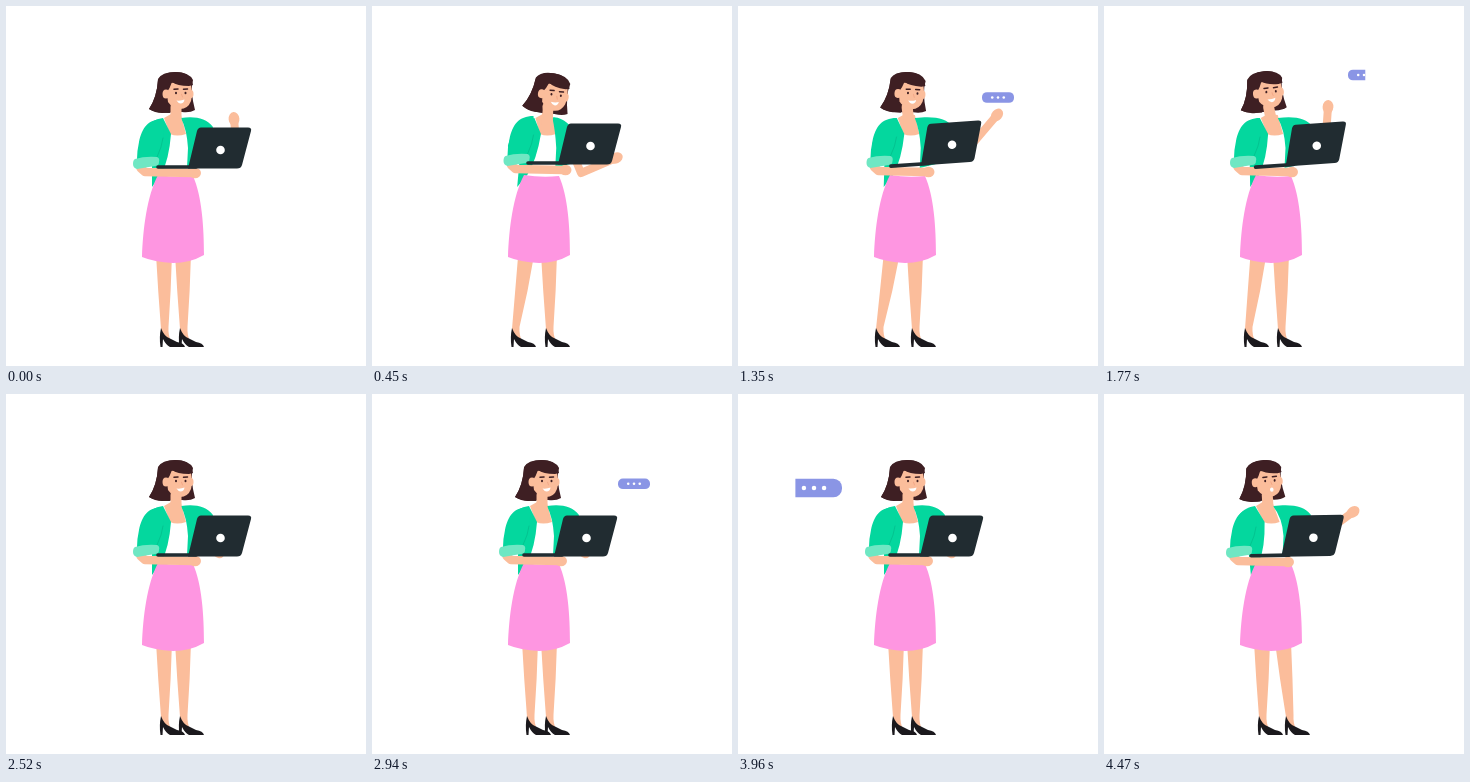
An HTML page with a canvas that plays this animation: 360 by 360 pixels, repeating every 4.5 s.

```html
<!DOCTYPE html>
<html lang="en">
<head>
<meta charset="utf-8">
<title>Woman with laptop</title>
<style>
html, body { margin: 0; width: 100%; height: 100%; overflow: hidden; background: #fff; }
canvas { display: block; width: 100vw; height: 100vh; }
</style>
</head>
<body>
<canvas id="stage"></canvas>
<script>
const LOOP = 4500, SIZE = 360;
const canvas = document.getElementById('stage');
const ctx = canvas.getContext('2d');
const C = {
  skin: '#fbbd9b', hair: '#3e1f23', green: '#04d79e', seam: '#04b587', cuff: '#6fe7c3',
  pink: '#fe96e1', dark: '#212c31', shoe: '#1b191d', bubble: '#8a95e5', white: '#fff'
};

const shapes = {
  skirt: 'M152 169 Q170 172 187 170 C196 190 198 222 198 249 Q184 257 167 257 Q148 256 136 251 C137 222 141 190 152 169Z',
  jacket: 'M157 112 C144 114 136 122 133 140 L139 158 L146 157 L146 181 L155 169 Q163 154 165 128 Z',
  shirt: 'M160 122 L181 122 Q185 143 183 168 L184 170 Q168 171 154 169 Z',
  neckline: 'M158 112 L165 108 L175 109 L180 128 Q171 131 164 128Z',
  sleeve: 'M157 113 C142 113 136 122 133 136 Q131 145 131 153 L151 153 Q156 143 158 130Z',
  cuff: 'M129 153 Q139 150 151 151 Q154 152 153 156 Q153 160 149 160 L131 163 Q127 162 127 158 Q127 154 129 153Z',
  hairBack: 'M152 73 Q156 66 169 66 Q183 66 187 74 Q184 85 189 104 Q184 107 176 106 L156 107 Q149 107 143 103 Q151 91 152 73Z',
  face: 'M160 80 Q160 76 171 77 L185 79 Q187 88 185 95 Q182 103 174 103 Q166 102 162 96Z',
  bangs: 'M152 74 Q157 66 170 66 Q184 66 187 79 L183 80 Q171 80 166 76 Q164 82 161 86 L160 95 Q164 102 164 107 Q149 107 143 103 Q151 91 152 74Z',
  smile: 'M170.5 94.5 Q175 95 178.5 93.5 Q178 97.5 174.5 97.5 Q172 97 170.5 94.5Z',
  shoe: 'M155 322 Q158 330 163 332 L171 336 Q178 337 179 341 L164 341 Q160 339 157 333 L156.5 341 L154.5 341 Q153 331 155 322Z',
  screen: 'M195 121.5 L242 121.5 Q246 121.5 245 125 L236 159 Q235 162.5 231 162.5 L182 162.5 L191 125 Q192 121.5 195 121.5Z'
};
for (const name in shapes) shapes[name] = new Path2D(shapes[name]);

const mix = (a, b, u) => a + (b - a) * u;

function ease(t, from, to) {
  const u = Math.min(1, Math.max(0, (t - from) / (to - from)));
  return u * u * (3 - 2 * u);
}

// Rises over a..b and falls over c..d.
const swell = (t, a, b, c, d) => ease(t, a, b) - ease(t, c, d);

// Elbow and hand of the free arm, blended from gesture to gesture.
function armPose(t) {
  const raised = [230, 135, 228, 113], low = [209, 167, 244, 152];
  const pointing = [236, 136, 259, 109], waving = [222, 130, 224, 101];
  const hidden = [204, 150, 212, 158], reaching = [230, 132, 249, 118];
  let pose = raised;
  const move = (next, from, to) => {
    pose = pose.map((v, i) => mix(v, next[i], ease(t, from, to)));
  };
  move(low, 0, 450);
  move(pointing, 500, 1150);
  move(waving, 1350, 1770);
  move(hidden, 1770, 2200);
  move(reaching, 3950, 4470);
  return pose;
}

function poseAt(t) {
  const lean = swell(t, 0, 450, 700, 1350);
  const tilt = swell(t, 900, 1350, 1800, 2250);
  const back = swell(t, 1350, 1770, 1770, 2200);
  const turned = ease(t, 3950, 4470);
  const nod = swell(t, 2900, 3390, 3390, 3900);
  return {
    head: [6.5 * lean - tilt - 5 * back - 7.5 * turned + 1.5 * nod, lean - back,
      9 * lean + 3 * tilt - 8 * back - 4 * turned],
    body: 4.5 * lean + 1.5 * tilt - 2.5 * back - 5 * turned,
    shoulder: 206 - 8 * lean + 8 * tilt - 6 * back,
    lift: turned - 3 * lean - tilt,
    laptop: [4 * lean - 1.3 * back - 5 * turned, -4 * Math.max(lean, tilt) + back, -4 * tilt - turned],
    arm: armPose(t),
    leftFoot: -15 * swell(t, 0, 450, 1770, 2200) - 2 * tilt + 3 * back,
    rightFoot: 8 * turned
  };
}

function fill(shape, color) {
  ctx.fillStyle = color;
  ctx.fill(shape);
}

function oval(x, y, rx, ry, color, angle = 0) {
  ctx.fillStyle = color;
  ctx.beginPath();
  ctx.ellipse(x, y, rx, ry, angle, 0, Math.PI * 2);
  ctx.fill();
}

function line(points, width, color) {
  ctx.strokeStyle = color;
  ctx.lineWidth = width;
  ctx.beginPath();
  points.forEach(([x, y]) => ctx.lineTo(x, y));
  ctx.stroke();
}

function group(draw) {
  ctx.save();
  draw();
  ctx.restore();
}

function place(pivotX, pivotY, [x, y, degrees]) {
  ctx.translate(x + pivotX, y + pivotY);
  ctx.rotate(degrees * Math.PI / 180);
  ctx.translate(-pivotX, -pivotY);
}

function leg(x, foot) {
  const hip = x + foot * 0.25, ankle = x + foot, knee = mix(hip, ankle, 0.45);
  ctx.fillStyle = C.skin;
  ctx.beginPath();
  ctx.moveTo(hip, 248);
  ctx.quadraticCurveTo(knee + 2, 285, ankle + 5, 323);
  ctx.quadraticCurveTo(ankle + 8, 333, ankle + 15, 335);
  ctx.quadraticCurveTo(ankle + 12, 329, ankle + 12.5, 321);
  ctx.quadraticCurveTo(knee + 15, 285, hip + 16, 248);
  ctx.fill();
  group(() => {
    ctx.translate(ankle - 150, 0);
    fill(shapes.shoe, C.shoe);
  });
}

function rightShoulder(shift, reach) {
  const neck = 175 + shift * 1.2, lapel = 182 + shift * 0.5;
  ctx.fillStyle = C.green;
  ctx.beginPath();
  ctx.moveTo(neck, 112);
  ctx.quadraticCurveTo(lapel - 1, 124, lapel, 142);
  ctx.lineTo(lapel - 1, 162);
  ctx.lineTo(198, 158);
  ctx.lineTo(reach + 1, 121);
  ctx.bezierCurveTo(reach - 6, 112, reach - 17, 110, neck, 112);
  ctx.fill();
}

function torso({ body, shoulder }) {
  group(() => {
    ctx.transform(1, 0, -body / 50, 1, body * 172 / 50, 0);
    fill(shapes.shirt, C.white);
    fill(shapes.neckline, C.skin);
    fill(shapes.jacket, C.green);
  });
  rightShoulder(body, shoulder);
}

function face(surprised) {
  fill(shapes.face, C.skin);
  oval(185, 88, 2.5, 4, C.skin);
  fill(shapes.bangs, C.hair);
  oval(160, 88, 3.5, 4.5, C.skin);
  for (const x of [170, 179.5]) {
    oval(x, 87, 1, 1.3, C.hair);
    line([[x - 2, 83.2], [x + 2, 83]], 1.5, C.hair);
  }
  line([[175.5, 88], [176.5, 91]], 0.6, '#ed9b7c');
  if (surprised) oval(176, 96, 1.8, 2.2, C.white);
  else fill(shapes.smile, C.white);
}

function rightArm([ex, ey, hx, hy]) {
  line([[202, 150], [ex, ey], [hx, hy]], 8, C.skin);
  oval(hx, hy, 7, 5.4, C.skin, Math.atan2(hy - ey, hx - ex));
}

function leftForearm({ body, lift }) {
  ctx.translate(body, lift);
  line([[134.5, 162], [139, 166], [187, 167]], 8.5, C.skin);
  oval(189, 167, 6, 5.2, C.skin);
  fill(shapes.sleeve, C.green);
  line([[151, 151], [155, 141], [157, 132]], 0.6, C.seam);
  fill(shapes.cuff, C.cuff);
}

function laptop(pose) {
  place(197, 150, pose);
  line([[152, 161], [190, 161]], 3.6, C.dark);
  fill(shapes.screen, C.dark);
  oval(214.5, 144, 4.3, 4.3, C.white);
}

function bubble(t, start, end, x, y, width, fromRight) {
  const height = width / 3, visible = swell(t, start, start + 150, end - 150, end);
  if (visible <= 0) return;
  group(() => {
    ctx.beginPath();
    ctx.rect(fromRight ? x + width * (1 - visible) : x, y - height, width * visible, height * 2);
    ctx.clip();
    ctx.fillStyle = C.bubble;
    ctx.beginPath();
    ctx.roundRect(x, y - height / 2, width, height, height * 0.46);
    ctx.fill();
    for (const k of [-1, 0, 1]) {
      oval(x + width * (0.5 + k * 0.18), y, height * 0.12, height * 0.12, C.white);
    }
  });
}

function bubbles(t) {
  const rise = start => mix(91.5, 69, ease(t, start + 270, start + 690));
  bubble(t, 1080, 1850, 244, rise(1080), 32, false);
  bubble(t, 2600, 3240, 246, rise(2600), 32, false);
  bubble(t, 50, 400, 48, 94, 56, true);
  bubble(t, 3850, 4370, 48, 94, 56, true);
}

function draw(t) {
  const ratio = window.devicePixelRatio || 1;
  const w = Math.round(innerWidth * ratio), h = Math.round(innerHeight * ratio);
  if (canvas.width !== w || canvas.height !== h) {
    canvas.width = w;
    canvas.height = h;
  }
  ctx.setTransform(w / SIZE, 0, 0, h / SIZE, 0, 0);
  ctx.fillStyle = C.white;
  ctx.fillRect(0, 0, SIZE, SIZE);
  ctx.lineCap = ctx.lineJoin = 'round';

  const pose = poseAt(t);
  const inHead = paint => group(() => {
    place(170, 106, pose.head);
    paint();
  });

  leg(150, pose.leftFoot);
  leg(169, pose.rightFoot);
  inHead(() => fill(shapes.hairBack, C.hair));
  torso(pose);
  fill(shapes.skirt, C.pink);
  line([[170 + pose.head[0] * 0.9, 101], [170 + pose.body * 1.1, 122]], 11, C.skin);
  inHead(() => face(t > 4300));
  rightArm(pose.arm);
  group(() => leftForearm(pose));
  group(() => laptop(pose.laptop));
  bubbles(t);
}

const began = performance.now();
function frame() {
  draw((performance.now() - began) % LOOP);
  requestAnimationFrame(frame);
}
frame();
</script>
</body>
</html>
```
